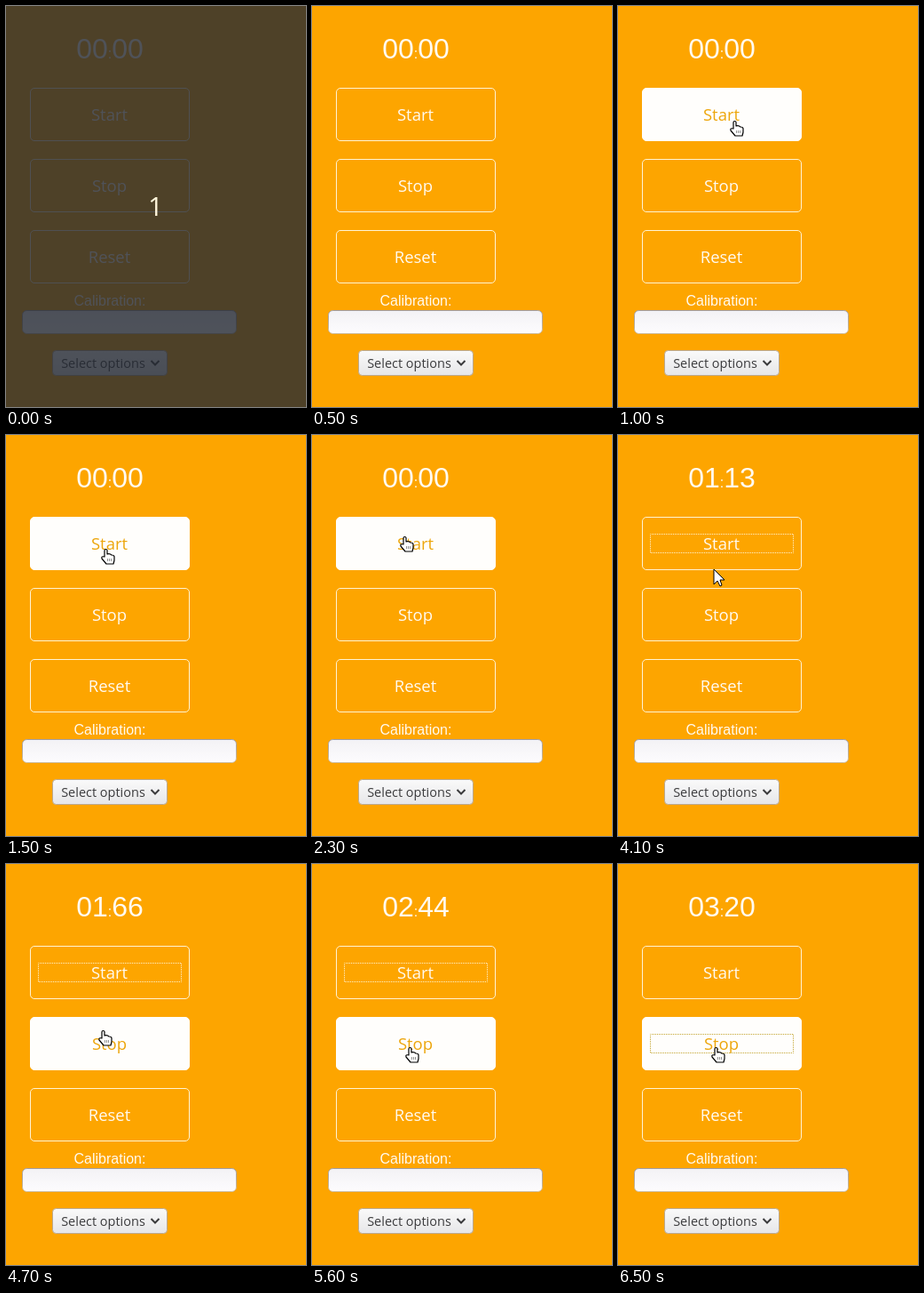
Write an HTML page that moves like this. It is 338 px wide and 451 px high and loops after 8 s.

```html
<!DOCTYPE html>
<html lang="en">
<head>
<meta charset="utf-8">
<title>Stopwatch</title>
<style>
html, body { margin: 0; height: 100%; overflow: hidden; background: #fda500; }
svg { display: block; }
text { text-anchor: middle; fill: #fffaf0; }
.ui { font-family: "Open Sans", "Noto Sans", sans-serif; font-size: 18.5px; }
.plain { font-family: "Liberation Sans", Arial, sans-serif; font-size: 16px; }
.box { fill: none; stroke: #fff3d2; }
.focus { fill: none; stroke: #fff3d2; stroke-dasharray: 1; stroke-dashoffset: .5; visibility: hidden; }
.hover .box { fill: #fffefc; stroke: #fffefc; }
.hover text { fill: #eda60c; }
.hover .focus { stroke: #c4a531; }
.focused .focus { visibility: visible; }
</style>
</head>
<body>
<svg width="338" height="451" viewBox="0 0 338 451">
  <defs>
    <linearGradient id="field" x2="0" y2="1"><stop stop-color="#f3f2f5"/><stop offset="1" stop-color="#fdfcfe"/></linearGradient>
    <linearGradient id="edge" x2="0" y2="1"><stop stop-color="#a19ca0"/><stop offset="1" stop-color="#cdb995"/></linearGradient>
    <linearGradient id="menu" x2="0" y2="1"><stop stop-color="#fafafa"/><stop offset="1" stop-color="#e6e6e8"/></linearGradient>
  </defs>
  <rect width="338" height="451" fill="#fda500"/>
  <text class="plain" x="117" y="59"><tspan id="sec" font-size="32">00</tspan>:<tspan id="cent" font-size="32">00</tspan></text>
  <g id="buttons"></g>
  <text class="plain" x="117" y="337">Calibration:</text>
  <rect x="18.5" y="342.5" width="241" height="26" rx="5" fill="url(#field)" stroke="url(#edge)"/>
  <rect x="52.5" y="387.5" width="129" height="28" rx="4" fill="url(#menu)" stroke="#bca88c"/>
  <text class="ui" x="109.5" y="407" style="font-size:14.5px;fill:#3a3a3c">Select options</text>
  <path d="M163.5 399l4.5 4.5 4.5-4.5" fill="none" stroke="#3a3a3c" stroke-width="2"/>
  <g id="cursor" stroke="#000" fill="#fff" stroke-linejoin="round">
    <path id="arrow" d="M0 0V17L4 13L7 19L9 18L7 12H12Z"/>
    <g id="hand" transform="translate(-5 0)">
      <path stroke-width="1.2" d="M4 9V2a1 1 0 0 1 3 0V6q3-1 5 1 3 0 3 2v4l-1 4H6L1 11q-1-3 3-2Z"/>
      <path d="M7.500 11v3m2 -3v3m2 -3v3" stroke="#777" stroke-width=".8"/>
    </g>
  </g>
  <g id="countdown">
    <rect width="338" height="451" fill="#242932" fill-opacity=".8"/>
    <text class="ui" x="168.500" y="236" style="font-size:30px;fill:#fff6dc">1</text>
  </g>
</svg>
<script>
const $ = id => document.getElementById(id);
const show = (id, on) => $(id).style.display = on ? '' : 'none';
const pad = v => String(v).padStart(2, '0');

const top0 = 92, pitch = 80;
$('buttons').innerHTML = ['Start', 'Stop', 'Reset'].map((label, i) => `
  <g transform="translate(27 ${top0 + pitch * i})">
    <rect class="box" x=".5" y=".5" width="179" height="59" rx="4.500"/>
    <text class="ui" x="89.500" y="37">${label}</text>
    <rect class="focus" x="9.500" y="19.500" width="161" height="21"/>
  </g>`).join('');
const buttons = [...$('buttons').children];

// Mouse presses on Start and Stop; the display freezes for a moment after each
const presses = [2800, 6300], freeze = 200;

// Pointer stops: time, x, y
const stops = [
  [700, 213, 132], [1200, 112, 128], [1500, 112, 128],
  [1900, 130, 104], [2300, 104, 114], [3500, 103, 113],
  [3800, 107, 115], [4700, 109, 187], [5600, 110, 206]
];

function pointer(t) {
  const i = stops.findLastIndex(s => s[0] <= t);
  const [t0, x0, y0] = stops[Math.max(i, 0)];
  const [t1, x1, y1] = stops[i + 1] || [t0 + 1, x0, y0];
  const p = Math.sin(Math.PI / 2 * Math.max(0, Math.min(1, (t - t0) / (t1 - t0))));
  return [x0 + (x1 - x0) * p, y0 + (y1 - y0) * p].map(Math.round);
}

function centiseconds(t) {
  const held = presses.find(p => t >= p && t < p + freeze) ?? t;
  return Math.round(Math.max(0, Math.min(320, (held - presses[0]) * .0873)));
}

function draw(now) {
  const t = Math.floor(now % 8000 / 100) * 100;
  show('countdown', t < 500);

  const n = centiseconds(t);
  $('sec').textContent = pad(Math.floor(n / 100));
  $('cent').textContent = pad(n % 100);

  const [x, y] = pointer(t);
  const visible = t >= stops[0][0];
  const focused = presses.findLastIndex(p => t >= p);
  let hovering = false;
  buttons.forEach((button, i) => {
    const dy = y - top0 - pitch * i;
    const over = visible && x < 207 && dy > 0 && dy < 59;
    hovering ||= over;
    button.classList.toggle('hover', over);
    button.classList.toggle('focused', i === focused);
  });

  show('cursor', visible);
  show('hand', hovering);
  show('arrow', !hovering);
  $('cursor').setAttribute('transform', `translate(${x} ${y})`);
  requestAnimationFrame(draw);
}
requestAnimationFrame(draw);
</script>
</body>
</html>
```
